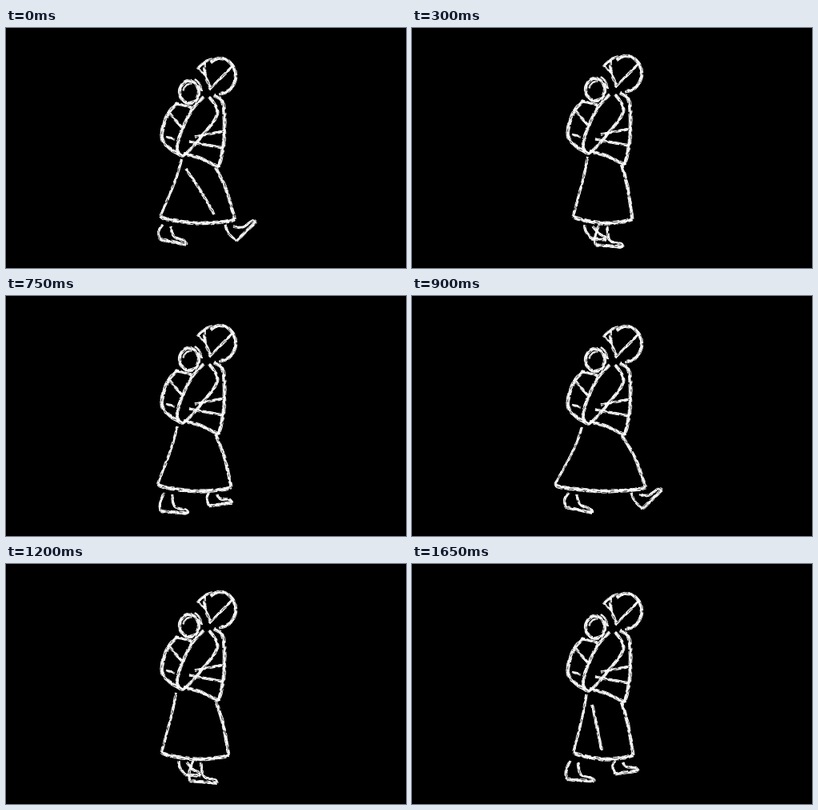
Recreate the animation shown at these times as an HTML page with a canvas. Size 500 by 300 pixels, loop 1800 ms.

```html
<!DOCTYPE html>
<html lang="en">
<head>
<meta charset="utf-8">
<title>Walking</title>
<style>
  html, body { margin: 0; height: 100%; overflow: hidden; background: #000; }
  canvas { display: block; }
</style>
</head>
<body>
<canvas id="stage" width="500" height="300"></canvas>
<script>
const ctx = document.getElementById('stage').getContext('2d');
const STEP = 150, STEPS = 12, HALF = STEPS / 2;
const { sin, cos, abs, PI } = Math;

let seed = 1;
function random() {
  seed = (seed * 16807) % 2147483647;
  return seed / 2147483647;
}

function spline(p0, p1, p2, p3, t) {
  return [0, 1].map(i => p1[i] + t / 2 * (p2[i] - p0[i]
    + t * (2 * p0[i] - 5 * p1[i] + 4 * p2[i] - p3[i]
    + t * (3 * (p1[i] - p2[i]) + p3[i] - p0[i]))));
}

function sample(points) {
  const out = [];
  points.slice(1).forEach((end, i) => {
    const start = points[i];
    const before = points[i - 1] || start, after = points[i + 2] || end;
    const count = Math.max(2, Math.round(Math.hypot(end[0] - start[0], end[1] - start[1]) / 3));
    for (let j = 0; j < count; j++) out.push(spline(before, start, end, after, j / count));
  });
  return [...out, points[points.length - 1]];
}

function trace(line, offset, roughness) {
  ctx.beginPath();
  line.forEach((p, i) => {
    const from = line[Math.max(0, i - 1)], to = line[Math.min(line.length - 1, i + 1)];
    const dx = to[0] - from[0], dy = to[1] - from[1], len = Math.hypot(dx, dy) || 1;
    const shift = offset + (random() - 0.5) * roughness;
    ctx.lineTo(p[0] - dy / len * shift, p[1] + dx / len * shift);
  });
  ctx.stroke();
}

// Chalk line: a solid core, broken bristles on both edges and a few dark scratches.
function chalk(points, width = 3.4) {
  const line = sample(points);
  ctx.strokeStyle = '#fff';
  ctx.setLineDash([]);
  ctx.lineWidth = width * 0.55;
  trace(line, 0, 0.5);
  ctx.lineWidth = 1;
  for (const side of [-0.48, -0.3, 0.3, 0.48]) {
    ctx.setLineDash([6 + random() * 14, 2 + random() * 4, 3 + random() * 8, 1 + random() * 3]);
    ctx.lineDashOffset = random() * 30;
    trace(line, side * width, 0.6);
  }
  ctx.strokeStyle = '#000';
  ctx.lineWidth = 0.7;
  ctx.setLineDash([2 + random() * 4, 8 + random() * 12]);
  trace(line, (random() - 0.5) * width * 0.6, 0.4);
}

function arc(cx, cy, rx, ry, from, to) {
  return Array.from({ length: 13 }, (_, i) => {
    const a = (from + (to - from) * i / 12) * PI / 180;
    return [cx + rx * cos(a), cy + ry * sin(a)];
  });
}

function drawHeads() {
  chalk(arc(268, 60, 19, 22, -130, 95), 3.6);
  chalk([[248, 43], [249, 58], [255, 74]], 3);
  chalk([[239, 51], [249, 42], [258, 39]], 2.6);
  chalk([[240, 50], [248, 58]], 2);
  chalk([[283, 48], [270, 61], [254, 77]], 2.8);
  chalk(arc(229, 80, 12, 14, -80, 285), 3.6);
  chalk(arc(230, 80, 8.5, 10, 190, 285), 1.6);
  chalk([[236, 64], [242, 70], [245, 79]], 2);
}

function drawTorso() {
  chalk([[214, 94], [204, 105], [197, 121], [195, 138], [204, 150], [220, 160]], 3.8);
  chalk([[212, 94], [234, 100]], 2.6);
  chalk([[205, 107], [221, 126]], 2.8);
  chalk([[200, 136], [211, 139]], 2);
  chalk([[247, 86], [232, 103], [219, 130], [214, 150], [220, 160],
    [233, 149], [247, 132], [260, 116], [264, 102], [254, 86]], 3.4);
  chalk([[260, 84], [270, 91], [273, 110], [272, 145], [266, 174]], 3.8);
  chalk([[236, 136], [272, 129]], 2.6);
  chalk([[229, 142], [250, 146], [271, 150]], 2.6);
  chalk([[222, 157], [243, 163], [266, 174]], 3.6);
}

// Heel position, toe direction and foot length; phase 0 is the heel strike in front.
function footAt(phase) {
  if (phase < HALF) {
    const u = phase / HALF, strike = Math.max(0, 1 - phase);
    return {
      x: 192 + 96 * (1 - u) ** 2.3, y: 266 + 6 * sin(PI * u),
      angle: 0.08 - 0.85 * strike, length: 34, ankle: 4 - 18 * strike
    };
  }
  const u = phase / HALF - 1, tuck = sin(PI * u) ** 2;
  return {
    x: 192 + 64 * sin(PI / 2 * u), y: 264 - 2 * u,
    angle: 0.2 - 0.4 * u, length: 34 - 20 * tuck, ankle: 4 - 16 * tuck
  };
}

function drawFoot(phase) {
  const { x, y, angle, length, ankle } = footAt(phase);
  const at = (along, up) => [
    x + along * cos(angle) + up * sin(angle),
    y + along * sin(angle) - up * cos(angle)
  ];
  const top = [x + ankle, 246];
  chalk([top, [x + ankle / 2 - 3, y - 10], at(0, 0)], 2.6);
  chalk([at(0, 0), at(length, 0)], 3.4);
  chalk([at(length, 0), at(length - 2, 4), at(length / 2, 7), [top[0] + 10, 248]], 2.6);
}

function drawSkirt(step, dy) {
  const swing = cos(PI * step / HALF), stretch = abs(swing) ** 12;
  const waist = 216 + 4 * cos(PI * (step - 1) / HALF), top = 164 + dy;
  const left = 198 - 12 * stretch + 7 * swing;
  const right = 277 + 12 * stretch - 3 * swing;
  chalk([[waist, top], [waist * 0.7 + left * 0.3, top + 27], [left, 235]], 2.4);
  chalk([[262, top + 10], [262 + (right - 262) * 0.55, top + 38], [right, 239]], 3.4);
  chalk([[left, 235], [left + 8, 239], [(left + right) / 2, 244], [right - 12, 242], [right, 239]], 4);
  if (swing > 0.8) {
    const tip = 232 + 28 * stretch;
    chalk([[225, 176], [225 + (tip - 225) * 0.6, 208], [tip, 233]], 3);
  }
}

function draw(step) {
  const dy = -Math.round(3.5 * sin(PI * step / HALF) ** 2);
  ctx.fillStyle = '#000';
  ctx.fillRect(0, 0, 500, 300);
  ctx.lineJoin = 'round';
  seed = 71;
  ctx.save();
  ctx.translate(0, dy);
  drawHeads();
  drawTorso();
  ctx.restore();
  drawFoot(step);
  drawFoot((step + HALF) % STEPS);
  drawSkirt(step, dy);
}

function tick() {
  draw(Math.floor(performance.now() / STEP) % STEPS);
  requestAnimationFrame(tick);
}
tick();
</script>
</body>
</html>
```
